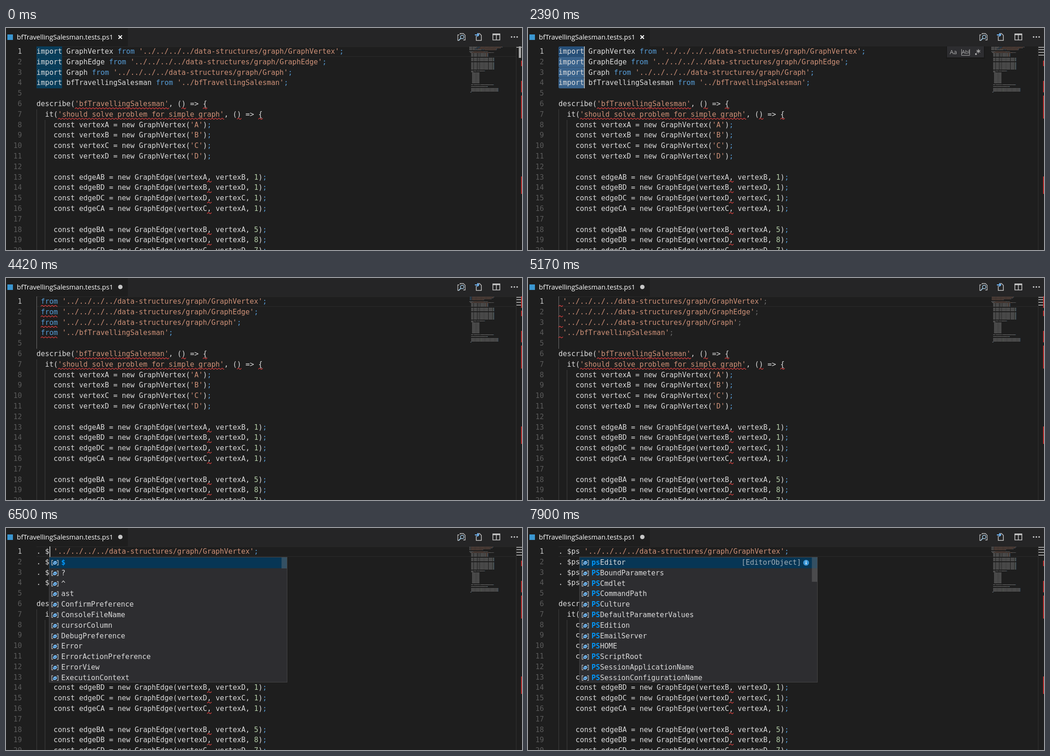
Recreate the animation shown at these times as an HTML page. Size 1117 px wide and 483 px high, loop 8 s.

```html
<!DOCTYPE html>
<html lang="en">
<head>
<meta charset="utf-8">
<title>Multi-cursor editing</title>
<style>
html, body { margin: 0; width: 100%; height: 100%; overflow: hidden; background: #1e1e1e; }
svg { display: block; width: 100%; height: 100%; }
text { font: 15.34px "DejaVu Sans Mono", "Noto Sans Mono", monospace; white-space: pre; }
.ui { font: 14.6px "Open Sans", "Noto Sans", sans-serif; }
.small { font-size: 13px; }
.tiny { font-size: 11.5px; }
.bold { font-weight: 700; }
</style>
</head>
<body>
<svg id="stage" viewBox="0 0 1117 483"></svg>
<script>
const LOOP = 8000, X0 = 66, Y0 = 40, CW = 9.235, LH = 22.8;
const FG = '#dcdcdc', BLUE = '#569cd6', STR = '#ce9178', NUM = '#b5cea8', RED = '#e84040';
const stage = document.getElementById('stage');
const colX = c => X0 + c * CW;
const rowY = n => Y0 + n * LH;
const baseY = n => Math.round(rowY(n)) + 16;

const rect = (x, y, w, h, fill, extra = '') =>
  `<rect x="${x}" y="${y}" width="${w}" height="${h}" fill="${fill}" ${extra}/>`;
const text = (x, y, s, fill, extra = '') =>
  `<text x="${x}" y="${y}" fill="${fill}" ${extra}>${s}</text>`;
const path = (d, stroke, w = 1.2, extra = '') =>
  `<path d="${d}" stroke="${stroke}" stroke-width="${w}" fill="none" ${extra}/>`;

// ---- document ----
const NAMES = ['GraphVertex', 'GraphEdge', 'Graph', 'bfTravellingSalesman'];
const FILES = NAMES.map((n, i) =>
  i < 3 ? `'../../../../data-structures/graph/${n}';` : `'../${n}';`);
const edge = (a, b, w) =>
  `    const edge${a}${b} = new GraphEdge(vertex${a}, vertex${b}, ${w});`;
const edges = s => s.split(' ').map(e => edge(e[0], e[1], e[2]));
const BODY = [
  '',
  "describe('bfTravellingSalesman', () => {",
  "  it('should solve problem for simple graph', () => {",
  ...[...'ABCD'].map(v => `    const vertex${v} = new GraphVertex('${v}');`),
  '',
  ...edges('AB1 BD1 DC1 CA1'),
  '',
  ...edges('BA5 DB8 CD7 AC4 AD2 DA3 BC3 CB9'),
  '',
  '    const graph = new Graph(true);',
  '    graph',
  ...'AB BD DC CA BA DB CD AC AD DA BC CB'.split(' ').map(e => `      .addEdge(edge${e})`),
  '',
  '    const salesmanPath = bfTravellingSalesman(graph);',
  '',
  '    expect(salesmanPath.length).toBe(4);',
  '',
  ...[...'ABCD'].map((v, i) =>
    `    expect(salesmanPath[${i}].getKey()).toEqual(vertex${v}.getKey());`),
  '  });'
];

function tokens(line) {
  return [...line.matchAll(/'[^']*'|;|\d|[^\s';\d]+/g)].map(m => {
    const s = m[0];
    const fill = s[0] === "'" ? STR : s === ';' || s === 'from' ? BLUE : /\d/.test(s) ? NUM : FG;
    return { s, fill, col: m.index };
  });
}
function codeLine(line, n, dimEnd) {
  return tokens(line).map(k =>
    text(colX(k.col), baseY(n), k.s, dimEnd && k.s === ';' ? '#6c6c6c' : k.fill)).join('');
}
function miniLine(line, n) {
  return tokens(line).map(k =>
    path(`M${1003 + k.col} ${41.5 + n * 2}h${k.s.length}`, k.fill, 1,
      'opacity=".6" stroke-dasharray="1.6 .6"')).join('');
}
// flat-topped wave, 7.2 px per period
function squiggle(n, from, to) {
  const wave = [[2.4, -2.2], [1.2, 0], [2.4, 2.2], [1.2, 0]];
  let d = `M${colX(from)} ${rowY(n + 1) - 1}`;
  for (let x = colX(from), i = 0; x < colX(to) - 1; i++) {
    const [dx, dy] = wave[i % 4];
    d += `l${dx} ${dy}`;
    x += dx;
  }
  return path(d, RED, 1.2);
}

// ---- parts that never change ----
function chrome() {
  const c = '#c5c5c5';
  return rect(0, 0, 1117, 40, '#252526') + rect(0, 0, 264, 40, '#1e1e1e') +
    rect(3, 14, 12, 12, '#3a96d0') +
    text(23.5, 25, 'bfTravellingSalesman.tests.ps1', '#fff', 'class="ui"') +
    path('M981 15H978V27H981M983 14V12H990L994 16V26H990', c, 1.3) +
    `<circle cx="987.5" cy="19.5" r="3.8" fill="none" stroke="#9fc6e0" stroke-width="1.5"/>` +
    path('M984.8 22.3L980 27', '#9fc6e0', 1.8) +
    path('M1018 17V27H1029V16L1025 12H1022', c, 1.5) +
    path('M1015 15H1023M1020 11.5L1023.5 15L1020 18.5', '#75beff', 1.8) +
    path('M1054 13.5H1069V26H1054ZM1061.5 13V26', c, 1.6) + rect(1053.3, 12, 16.4, 3.5, c) +
    [1095, 1101, 1107].map(x => `<circle cx="${x - 0.5}" cy="19.5" r="1.7" fill="${c}"/>`).join('');
}
function body() {
  let s = path('M66.5 177V483M84.5 200V483', '#404040', 1);
  for (let n = 0; n < 20; n++)
    s += text(34.5, baseY(n), n + 1, n ? '#5a5a5a' : '#c6c6c6', 'text-anchor="end"');
  BODY.forEach((line, i) => {
    if (i < 16) s += codeLine(line, i + 4);
    s += miniLine(line, i + 4);
  });
  s += squiggle(5, 9, 31) + squiggle(5, 34, 35) + squiggle(5, 39, 40);
  s += squiggle(6, 5, 44) + squiggle(6, 47, 48) + squiggle(6, 52, 53);
  for (const n of [12, 13, 14, 15, 17, 18]) s += squiggle(n, 40, 41);
  s += path('M1104.5 40V483', '#333', 1);
  for (const [y, h] of [[71, 12], [115, 25], [147, 50], [323, 38]])
    s += rect(1115, y, 2, h, '#c0302f');
  return s;
}
const CHROME = chrome(), TEXT = body();

// ---- timeline ----
// last entry whose start time has passed
const at = (list, t) => list.reduce((v, [t0, x]) => t >= t0 ? x : v, list[0][1]);
const PREFIX = [
  [0, n => `import ${n} from `], [2940, n => ` ${n} from `], [3480, () => ' from '],
  [4710, () => ' '], [5970, () => '. '], [6040, () => '.  '],
  [6420, () => '. $ '], [6580, () => '. $p '], [7440, () => '. $ps ']
];
// caret column, -1 when blinked off
const CARET = [
  [0, -1], [290, 6], [820, -1], [1140, 4], [1370, 6], [2940, 0], [4010, -1], [4480, 0],
  [5170, -1], [5720, 0], [5970, 1], [6040, 2], [6420, 3], [6580, 4], [7220, -1], [7440, 5], [7900, -1]
];
const COUNT = [[0, 1], [1850, 2], [2240, 3], [2390, 4]];
const MOUSE = [
  [70, 1122, 442], [830, 113, 70], [990, 107, 67], [1370, 107, 67],
  [1610, 857, 207], [1850, 857, 207], [2010, 1125, 148]
];

function mouse(t) {
  if (t < 70 || t >= 2010) return '';
  t = 70 + Math.floor((t - 70) / 76) * 76;
  const i = MOUSE.findIndex(m => t < m[0]);
  const [t0, xa, ya] = MOUSE[i - 1], [t1, xb, yb] = MOUSE[i];
  const u = (t - t0) / (t1 - t0), e = u * u * (3 - 2 * u);
  const x = Math.round(xa + (xb - xa) * e), y = Math.round(ya + (yb - ya) * e);
  return path(`M${x - 4} ${y - 10}h3l1 1l1 -1h3M${x} ${y - 9}v18M${x - 4} ${y + 10}h3l1 -1l1 1h3`, '#e0e0e0', 1.4);
}

function findBar() {
  const c = '#b0b0b0';
  return rect(905, 40, 84, 27, '#171717', 'opacity=".6"') + rect(907, 40, 80, 24, '#2d2d30') +
    text(913, 57, 'Aa', c, 'class="ui small"') +
    text(939, 56, 'Abl', c, 'class="ui tiny"') +
    path('M938.5 46V59.5H956V46', c, 1) +
    rect(968, 55, 3.5, 3.5, c) + path('M975 46V55M971 48.3L979 52.7M979 48.3L971 52.7', c, 1.4);
}

const ALL = '$ ? ^ ast ConfirmPreference ConsoleFileName cursorColumn DebugPreference Error ErrorActionPreference ErrorView ExecutionContext';
const PS = 'psEditor PSBoundParameters PSCmdlet PSCommandPath PSCulture PSDefaultParameterValues PSEdition PSEmailServer PSHOME PSScriptRoot PSSessionApplicationName PSSessionConfigurationName';
const P = 'PID PROFILE ProgressPreference psEditor PSBoundParameters PSCmdlet PSCommandPath PSCulture PSDefaultParameterValues PSEdition PSEmailServer PSHOME';
const POPUP = [
  [0, null],
  [6500, { x: 93, items: ALL, match: /^\$/, bar: 24 }],
  [6580, { x: 93, items: P, match: /^p/i, bar: 48 }],
  [6740, { x: 103, items: P, match: /^p/i, bar: 48 }],
  [7440, { x: 111, items: PS, match: /^ps/i, bar: 53, type: '[EditorObject]' }]
];
function icon(x, y) {
  return path(`M${x + 4} ${y - 5}h-3v10h3M${x + 12} ${y - 5}h3v10h-3`, '#b8b8b8', 1.3) +
    `<path d="M${x + 3.5} ${y - 0.5}L${x + 8} ${y - 4}L${x + 12.5} ${y - 2.5}V${y + 1}L${x + 8} ${y + 4.5}L${x + 3.5} ${y + 3}Z" fill="#75beff"/>` +
    path(`M${x + 4} ${y}L${x + 8} ${y + 1.2}L${x + 12} ${y - 2}`, '#2d2d30', 0.9);
}
function popup({ x, items, match, bar, type }) {
  let s = rect(x + 0.5, 63.5, 515, 272, '#2d2d30', 'stroke="#454545"') +
    rect(x + 1, 64, 514, 23.5, '#073655') +
    rect(x + 503.5, 64, 11.5, bar, '#797979', 'opacity=".4"');
  items.split(' ').forEach((item, i) => {
    const y = Math.round(75 + i * LH), hit = (item.match(match) || [''])[0];
    s += icon(x + 5, y + 0.5);
    if (hit) s += text(x + 26.5, y + 5, hit, '#0097fb', 'class="bold"');
    s += text(x + 26.5 + hit.length * CW, y + 5, item.slice(hit.length), FG);
  });
  if (type) s += text(x + 351, 80, type, '#a0acb5') +
    `<circle cx="${x + 491}" cy="75.5" r="6.3" fill="#3b97d8"/>` +
    rect(x + 490.2, 74.5, 1.7, 4.5, '#fff') + rect(x + 490.2, 71.5, 1.7, 1.8, '#fff');
  return s;
}

function frame(t) {
  const prefix = at(PREFIX, t), caret = at(CARET, t), count = at(COUNT, t), pop = at(POPUP, t);
  const selecting = t >= 1370 && t < 2940, stale = t >= 4330 && t < 5490;
  let s = rect(0, 0, 1117, 483, '#1e1e1e');

  if (!selecting) s += path('M66 40.5H1104M66 62H1104', '#282828', 1.6);
  if (t < 2940) for (let n = 0; n < 4; n++) {
    const on = selecting && n < count;
    s += rect(X0, rowY(n), 6 * CW, LH, on ? (n ? '#3a638c' : '#264f78') : '#083d5a', on ? 'rx="3"' : '');
  }
  // indent guide of the block that holds the carets
  if (t >= 2940 && t < 5970) s += path('M66.5 40V154', '#707070', 1);

  s += TEXT;
  FILES.forEach((file, n) => {
    const line = prefix(NAMES[n]) + file;
    s += codeLine(line, n, t >= 4710 && t < 5970) + miniLine(line, n);
    if (stale) s += t < 4710 ? squiggle(n, 1, 5) : squiggle(n, 0, 1);
  });

  if (t < 1850) s += rect(1110, 40, 5, 25, '#a6a6a6');
  for (let n = 0; n < count; n++) {
    s += rect(1105, Math.round(40.5 + n * 5.85), 12, 2, '#a0a0a0');
    if (caret >= 0) s += rect(Math.round(colX(caret)), rowY(n), 2, LH, '#aeafad');
  }
  if (stale) s += rect(1115, 40, 2, 25, '#c0302f');

  s += CHROME;
  s += t < 2940
    ? path('M243.5 16L251 23.5M251 16L243.5 23.5', '#fff', 2.2)
    : '<circle cx="247.5" cy="19.5" r="4.8" fill="#c5c5c5"/>';
  if (t >= 1850 && t < 4400) s += findBar();
  if (pop) s += popup(pop);
  return s + mouse(t);
}

let shown = '';
function tick() {
  const s = frame(performance.now() % LOOP);
  if (s !== shown) stage.innerHTML = shown = s;
  requestAnimationFrame(tick);
}
tick();
</script>
</body>
</html>
```
